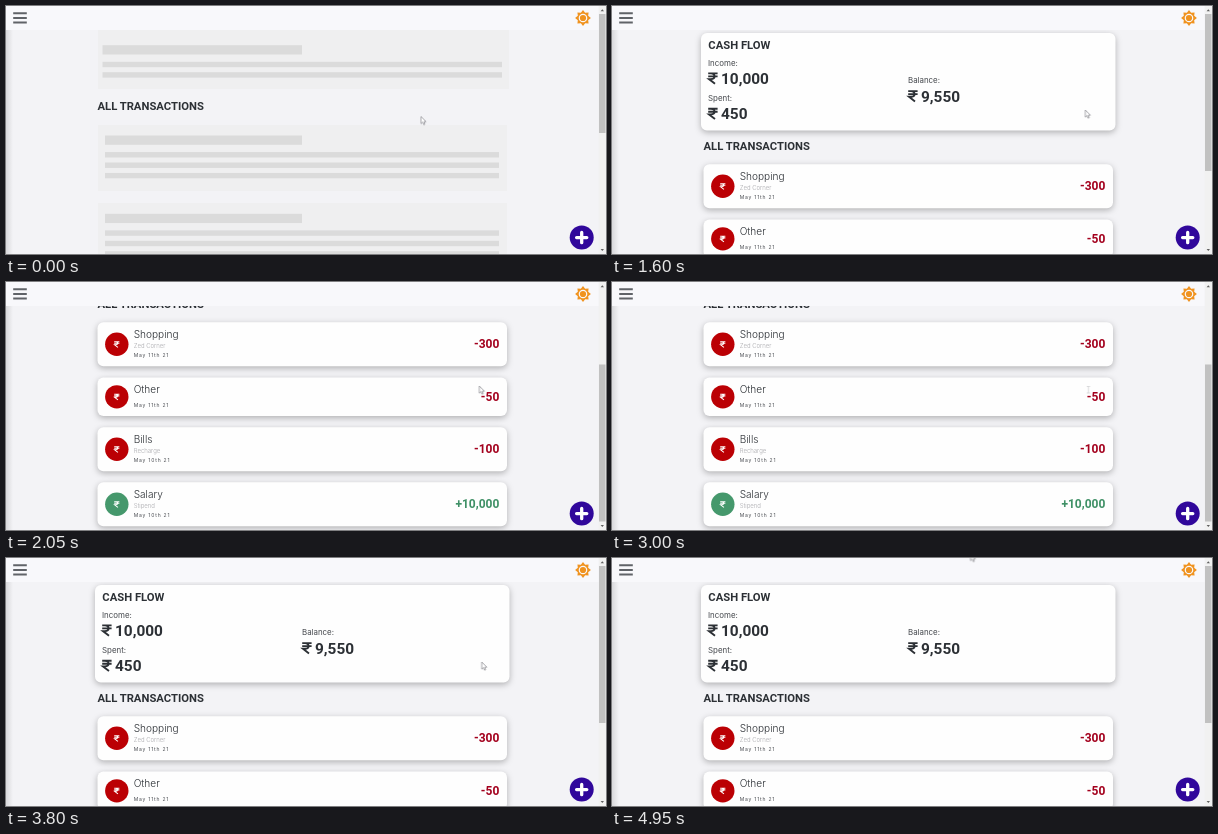
Recreate the animation shown at these times as an HTML page. Size 600 by 248 pixels, loop 5000 ms.

```html
<!DOCTYPE html>
<html lang="en">
<head>
<meta charset="utf-8">
<title>Cash flow</title>
<style>
html, body { margin: 0; width: 100%; height: 100%; overflow: hidden; background: #f3f3f6; }
svg { display: block; width: 600px; height: 248px; font-family: Roboto, sans-serif; fill: #2c3035; }

.h { font-size: 11.25px; font-weight: 700; }
.label, .name, .note, .date { font-family: Inter, sans-serif; }
.label { font-size: 7.9px; fill: #45484d; }
.sum { font-size: 15.4px; font-weight: 700; }
.card { fill: #fefefe; filter: drop-shadow(0 2px 3px rgba(0, 0, 0, .28)); }
.name { font-size: 10.1px; font-weight: 300; }
.note { font-size: 6px; font-weight: 300; fill: #a8a8ac; }
.date { font-size: 5px; letter-spacing: .8px; fill: #4a4d52; }
.amount { font-size: 12px; font-weight: 700; text-anchor: end; }
.bone { fill: #dbdbdb; }
.pane { fill: #efeff0; }
.rs { fill: none; stroke-width: 1.9; }

#skeleton, #loaded, #page, #thumb, #pointer, #arrow, #beam { animation: 5s infinite; }
#skeleton { animation-name: skeleton; animation-timing-function: step-end; }
#loaded { animation-name: loaded; animation-timing-function: step-end; }
#page { animation-name: scroll; --to: -118px; }
#thumb { animation-name: scroll; --to: 74.5px; }
#pointer { animation-name: move; }
#arrow { animation-name: arrow; animation-timing-function: step-end; }
#beam { animation-name: beam; animation-timing-function: step-end; }

@keyframes skeleton { 0% { visibility: visible } 5%, 100% { visibility: hidden } }
@keyframes loaded { 0% { visibility: hidden } 5%, 100% { visibility: visible } }
@keyframes scroll {
  0%, 32.4% { transform: none; animation-timing-function: ease-in-out }
  39% { transform: translateY(var(--to)) }
  68% { transform: translateY(var(--to)); animation-timing-function: ease-in-out }
  74.8%, 100% { transform: none }
}
@keyframes move {
  0%, 18% { transform: translate(415px, 110.5px); animation-timing-function: ease-in-out }
  28%, 42% { transform: translate(473.3px, 104px) }
  44%, 88% { transform: translate(475.7px, 104px); animation-timing-function: ease-in }
  99%, 100% { transform: translate(358.5px, -4.5px) }
}
@keyframes arrow { 0% { visibility: visible } 43% { visibility: hidden } 69%, 100% { visibility: visible } }
@keyframes beam { 0% { visibility: hidden } 43% { visibility: visible } 69%, 100% { visibility: hidden } }
</style>
</head>
<body>
<svg viewBox="0 0 600 248">
  <defs>
    <linearGradient id="edge">
      <stop stop-color="#000" stop-opacity=".11"/>
      <stop offset="1" stop-color="#000" stop-opacity="0"/>
    </linearGradient>
    <path id="rupee" class="rs" d="M0 .9H9.4M0 3.9H9.4M0 .9H2.8C7.6 .9 7.6 6.6 2.8 6.6H.8L6.8 11.2"/>
  </defs>
  <rect width="600" height="248" fill="#f3f3f6"/>
  <rect y="24" width="7" height="224" fill="url(#edge)"/>
  <rect x="592.5" width="7.5" height="248" fill="#f1f1f1"/>

  <g id="skeleton">
    <g id="bones"></g>
    <text class="h" x="91.5" y="104">ALL TRANSACTIONS</text>
    <rect x="593" y="8" width="6.5" height="119" fill="#c1c1c1"/>
  </g>

  <g id="loaded">
    <g id="page">
      <rect class="card" x="89" y="27" width="414.5" height="97.5" rx="6"/>
      <text class="h" x="96.3" y="43.2">CASH FLOW</text>
      <g id="sums"></g>
      <text class="h" x="91.5" y="144.2">ALL TRANSACTIONS</text>
      <g id="rows"></g>
    </g>
    <rect id="thumb" x="593" y="8" width="6.5" height="157" fill="#c1c1c1"/>
  </g>

  <rect width="592.5" height="24" fill="#f8f8fb"/>
  <path d="M7.2 7.2H20.8M7.2 11.9H20.8M7.2 16.6H20.8" stroke="#606368" stroke-width="2"/>
  <g transform="translate(577 12)" fill="#f0931f">
    <path id="sun"/>
    <circle r="4.3" fill="#f8f8fb"/>
    <circle r="3.1"/>
  </g>
  <path d="M594.6 5.2l1.7-2 1.7 2zM594.6 243l1.7 2 1.7-2z" fill="#606060"/>
  <circle cx="575.7" cy="231.6" r="12" fill="#30079b"/>
  <path d="M570.6 231.6h10.2M575.7 226.5v10.2" stroke="#fff" stroke-width="3.3" stroke-linecap="round"/>

  <g id="pointer">
    <path id="arrow" d="M0 0V7.2L1.7 5.7 2.8 8.2 4 7.6 2.9 5.2H5.1Z" fill="#fff" stroke="#85858a" stroke-width=".7"/>
    <path id="beam" d="M-1 .5H2.4M.7 .5V7M-1 7H2.4" fill="none" stroke="#c4c4c8" stroke-width=".6"/>
  </g>
</svg>
<script>
const fill = (id, html) => document.getElementById(id).innerHTML = html;
const rupee = (x, y, color, scale = 1) =>
  `<use href="#rupee" stroke="${color}" transform="translate(${x} ${y}) scale(${scale})"/>`;
const bar = (x, y, w, h) => `<rect class="bone" x="${x}" y="${y}" width="${w}" height="${h}"/>`;

function bones(x, y, w, lines) {
  let out = bar(x, y, 296 - x, 9.3);
  for (let i = 0; i < lines; i++) out += bar(x, y + 16.6 + i * 10.4, w, 5.4);
  return out;
}
fill('bones', `
  <rect class="pane" x="92" y="24" width="411" height="59"/>
  <rect class="pane" x="92" y="119" width="409" height="66"/>
  <rect class="pane" x="92" y="197" width="409" height="60"/>` +
  bones(96.5, 39.2, 399.5, 2) + bones(99, 129.5, 394, 3) + bones(99, 207.8, 394, 3));

const sum = (x, y, label, value) => `
  <text class="label" x="${x}" y="${y}">${label}:</text>
  ${rupee(x + .2, y + 7, '#2c3035')}
  <text class="sum" x="${x + 13}" y="${y + 18.4}">${value}</text>`;
fill('sums', sum(96, 59.5, 'Income', '10,000') + sum(96, 94.8, 'Spent', '450') +
  sum(296, 77.2, 'Balance', '9,550'));

const red = ['#bb0004', '#a3001d'], green = ['#45986c', '#3f9066'];
const rows = [
  [158.3, 44, 'Shopping', 'Zed Corner', 'May 11th 21', '-300', red],
  [213.6, 38.5, 'Other', '', 'May 11th 21', '-50', red],
  [263.3, 44, 'Bills', 'Recharge', 'May 10th 21', '-100', red],
  [318.3, 44, 'Salary', 'Stipend', 'May 10th 21', '+10,000', green]
];
fill('rows', rows.map(([y, h, name, note, date, amount, [disc, ink]]) => {
  const mid = y + h / 2;
  return `<rect class="card" x="91.5" y="${y}" width="409.5" height="${h}" rx="6"/>
    <circle cx="110.8" cy="${mid}" r="11.7" fill="${disc}"/>
    ${rupee(108.2, mid - 3.1, '#fff', .55)}
    <text class="name" x="127.7" y="${y + 15.6}">${name}</text>
    <text class="note" x="127.7" y="${y + 26}">${note}</text>
    <text class="date" x="127.7" y="${y + h - 8.9}">${date}</text>
    <text class="amount" x="493.3" y="${mid + 4}" fill="${ink}">${amount}</text>`;
}).join(''));

// Sixteen alternating radii make the eight-pointed sun.
const points = Array.from({ length: 16 }, (_, i) => {
  const r = i % 2 ? 5.6 : 7.9, a = i * Math.PI / 8;
  return `${(r * Math.cos(a)).toFixed(2)} ${(r * Math.sin(a)).toFixed(2)}`;
});
document.getElementById('sun').setAttribute('d', `M${points.join('L')}Z`);
</script>
</body>
</html>
```
